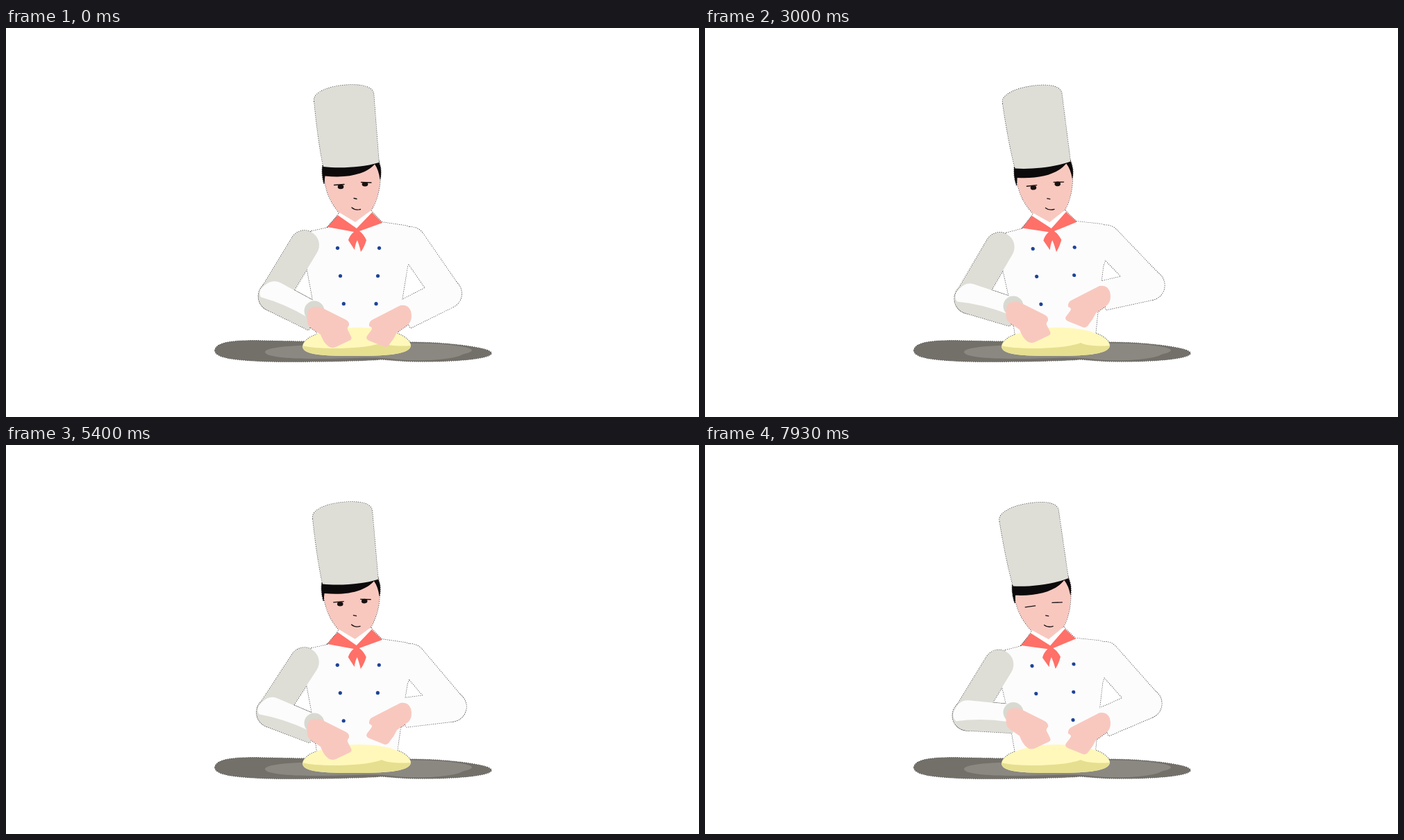
An HTML page that plays this animation: 998 px wide and 561 px high, repeating every 8 s.

```html
<!DOCTYPE html>
<html lang="en">
<head>
<meta charset="utf-8">
<title>Chef kneading dough</title>
<style>
  html, body { margin: 0; width: 100%; height: 100%; overflow: hidden; background: #fff; }
  svg { display: block; width: 100%; height: 100%; }
  .face-line { fill: none; stroke: #1a1111; stroke-width: 1.3; stroke-linecap: round; }
</style>
</head>
<body>
<svg viewBox="0 0 998 561">
  <!-- dotted rim: only its outer half shows around the silhouette -->
  <use href="#art" stroke="#3c3c3c" stroke-width="1.5" stroke-dasharray="1.2 1.6"/>
  <g id="art">
    <g id="body">
      <path fill="#fcfcfc" d="M463 288 L440 293 L433 345 L441 388 L449 452 H562 L571 388 L578 345 L592 308 Q592 288 575 285 L541 280 L526 264 L478 270Z"/>
      <g id="buttons" fill="#1f4496"></g>
      <g id="head">
        <path fill="#f8c8bf" d="M457 198 L459 220 C462 243 472 257 481 268 L503 280 L525 264 C534 250 540 230 539 205 L537 192Z"/>
        <path fill="#0d0a0b" d="M456 198 Q454 212 458 225 L459.500 213.500 C492 217 518 211 531 196.500 Q537 205 538.500 219 Q542 206 537 193Z"/>
        <path fill="#deded7" d="M444 106 Q443 100 447 96 C458 86 480 82 499 82 C514 82 529 85 529.500 96 L537 194 C515 201 480 203 457 200 Q449 160 444 106Z"/>
        <g id="lids" class="face-line"><path d="M472.500 226.500 L487 225.500 M511.500 222.500 L526 223"/></g>
        <g id="eyes" fill="#1a1111" stroke="none">
          <ellipse cx="482" cy="229" rx="4.300" ry="3.300"/>
          <ellipse cx="517" cy="225.300" rx="4.300" ry="3.300"/>
        </g>
        <path class="face-line" d="M501 245.500 L505 246.500"/>
        <path class="face-line" d="M498 259 Q503 263.500 510.500 261.500"/>
      </g>
      <path fill="#fff" d="M480 266 L503 280 L526 263 L530 272 L505 293 L475 274Z"/>
      <path fill="#ff7068" d="M478 270 L463 287 L501 294 Q495 299 493 306 L502 320 Q503 311 506 306 Q509 314 511 323 Q516 316 519 306 Q515 297 509 293 L542 281 L527 266 L505 289Z"/>
    </g>
    <g id="leftUpper"><path fill="#deded7" d="M0 -21 H87 A21 21 0 0 1 87 21 H0 A21 21 0 0 1 0 -21Z"/></g>
    <g id="leftFore">
      <path fill="#deded7" d="M0 -22 L67 -20 V21 L0 21.500 A21.700 21.700 0 0 1 0 -22Z"/>
      <path fill="#fcfcfc" d="M-21 -1 C-17 -16 -10 -22 0 -22 L62 -20 L58 5 Q20 2 -16 9 Q-21 5 -21 -1Z"/>
    </g>
    <g id="rightUpper"><path fill="#fcfcfc" d="M0 -21 H91 A21 21 0 0 1 91 21 H0 A21 21 0 0 1 0 -21Z"/></g>
    <g id="rightFore"><path fill="#fcfcfc" d="M0 -21.500 L69 -21 V21 L0 21.500 A21.500 21.500 0 0 1 0 -21.500Z"/></g>
    <path fill="#737069" d="M301 465 C302 453 328 450 370 451 C440 453 560 452 615 454 C652 456 699 462 699 469 C699 476 655 481 600 481 C565 481 552 478 539 478 C515 480 440 482 378 481 C330 479 301 476 301 465Z"/>
    <path fill="#8b8882" stroke="none" d="M373 467 C376 459 425 457 480 457 C530 455 585 453 630 456 C652 458 671 461 671 465 C669 469 660 469 655 472 C640 479 590 481 562 478 C530 473 500 477 445 477 C405 477 372 474 373 467Z"/>
    <path fill="#fff8ba" d="M427 459 C428 445 464 432 508 432 C554 432 582 445 583 458 C582 470 552 473 505 473 C452 473 427 471 427 459Z"/>
    <path fill="#e6df90" stroke="none" d="M427 458 C440 463 512 465 541 454 C551 459 570 459 583 458 C582 470 552 473 505 473 C452 473 427 471 427 458Z"/>
    <g id="leftHand">
      <circle cx="444" cy="408" r="14.500" fill="#d8d9d1"/>
      <path fill="#f8c8bf" d="M434 413 Q434 403 444 402 Q450 401 456 404 L488 420 Q495 423 494 429 Q490 433 493 437 L497 445 Q499 449 494 451 L475 460 Q468 463 463 458 Q457 453 453 442 L437 431 Q432 425 434 413Z"/>
    </g>
    <g id="rightHand">
      <path fill="#f8c8bf" d="M583 408 Q579 398 568 400 L529 420 Q522 423 523 430 Q529 432 526 436 L520 444 Q517 448 523 451 L543 459 Q549 462 553 455 Q559 448 563 439 L580 427 Q586 420 583 408Z"/>
    </g>
  </g>
</svg>
<script>
  const LOOP = 8000, STEP = 1000 / 15, PIVOT = { x: 505, y: 465 };
  const LEAN = -2.6, LEAN_PERIOD = 27.5, FALL = 10;
  const HEAD_KEYS = [[0, 0], [21, -.6], [45, -.8], [57, -1.1], [81, -.5], [105, -1.3], [119, -1.3]];
  const ARMS = {
    left: { shoulder: { x: 430, y: 313 }, wrist: { x: 445, y: 417 }, upper: 86.6, fore: 67, bend: 1, start: 7.1 },
    right: { shoulder: { x: 583, y: 308 }, wrist: { x: 573, y: 414 }, upper: 91, fore: 69, bend: -1, start: 1.77 }
  };
  const el = id => document.getElementById(id);
  const place = (id, value) => el(id).setAttribute('transform', value);
  const smooth = x => (1 - Math.cos(Math.PI * x)) / 2;
  const degrees = (a, b) => Math.atan2(b.y - a.y, b.x - a.x) * 180 / Math.PI;

  el('buttons').innerHTML = [[477.5, 537.5, 317.3], [481.5, 535.5, 357.5], [486.3, 533, 397.7]]
    .map(([a, b, y]) => [a, b].map(x => `<circle cx="${x}" cy="${y}" r="2.6"/>`).join('')).join('');

  // 1 is upright, 0 is leaning furthest; quick fall, slower recovery
  function upright(step) {
    const p = step % LEAN_PERIOD;
    return p < FALL ? 1 - smooth(p / FALL) : smooth(((p - FALL) / (LEAN_PERIOD - FALL)) ** 1.4);
  }

  function headTilt(step) {
    const i = Math.max(1, HEAD_KEYS.findIndex(([at]) => at >= step));
    const [t0, a0] = HEAD_KEYS[i - 1], [t1, a1] = HEAD_KEYS[i];
    return a0 + (a1 - a0) * smooth((step - t0) / (t1 - t0));
  }

  // Each hand rests on the dough until its first stroke
  const handLift = (step, start) =>
    step < start ? 0 : -31 * smooth((step - start) / 6);

  function turn(point, angle) {
    const r = angle * Math.PI / 180, x = point.x - PIVOT.x, y = point.y - PIVOT.y;
    return {
      x: PIVOT.x + x * Math.cos(r) - y * Math.sin(r),
      y: PIVOT.y + x * Math.sin(r) + y * Math.cos(r)
    };
  }

  function elbow(s, w, { upper, fore, bend }) {
    const d = Math.hypot(w.x - s.x, w.y - s.y);
    const cos = (upper * upper + d * d - fore * fore) / (2 * upper * d);
    const a = Math.atan2(w.y - s.y, w.x - s.x) + bend * Math.acos(Math.min(1, cos));
    return { x: s.x + upper * Math.cos(a), y: s.y + upper * Math.sin(a) };
  }

  function poseArm(side, lean, step) {
    const arm = ARMS[side], lift = handLift(step, arm.start);
    const s = turn(arm.shoulder, lean);
    const w = { x: arm.wrist.x, y: arm.wrist.y + lift };
    const e = elbow(s, w, arm);
    place(side + 'Upper', `translate(${s.x} ${s.y}) rotate(${degrees(s, e)})`);
    place(side + 'Fore', `translate(${e.x} ${e.y}) rotate(${degrees(e, w)})`);
    place(side + 'Hand', `translate(0 ${lift})`);
  }

  function draw(ms) {
    const step = Math.floor((ms % LOOP) / STEP + .05);
    const n = Math.min(step, 119);
    const lean = LEAN * (1 - upright(n));
    const closed = n >= 118;
    place('body', `rotate(${lean} ${PIVOT.x} ${PIVOT.y})`);
    place('head', `rotate(${headTilt(n)} 503 275)`);
    place('lids', `translate(0 ${closed ? 5 : 0})`);
    el('eyes').setAttribute('visibility', closed ? 'hidden' : 'visible');
    poseArm('left', lean, n);
    poseArm('right', lean, n);
  }

  const begin = performance.now();
  function tick() {
    draw(performance.now() - begin);
    requestAnimationFrame(tick);
  }
  draw(0);
  requestAnimationFrame(tick);
</script>
</body>
</html>
```
